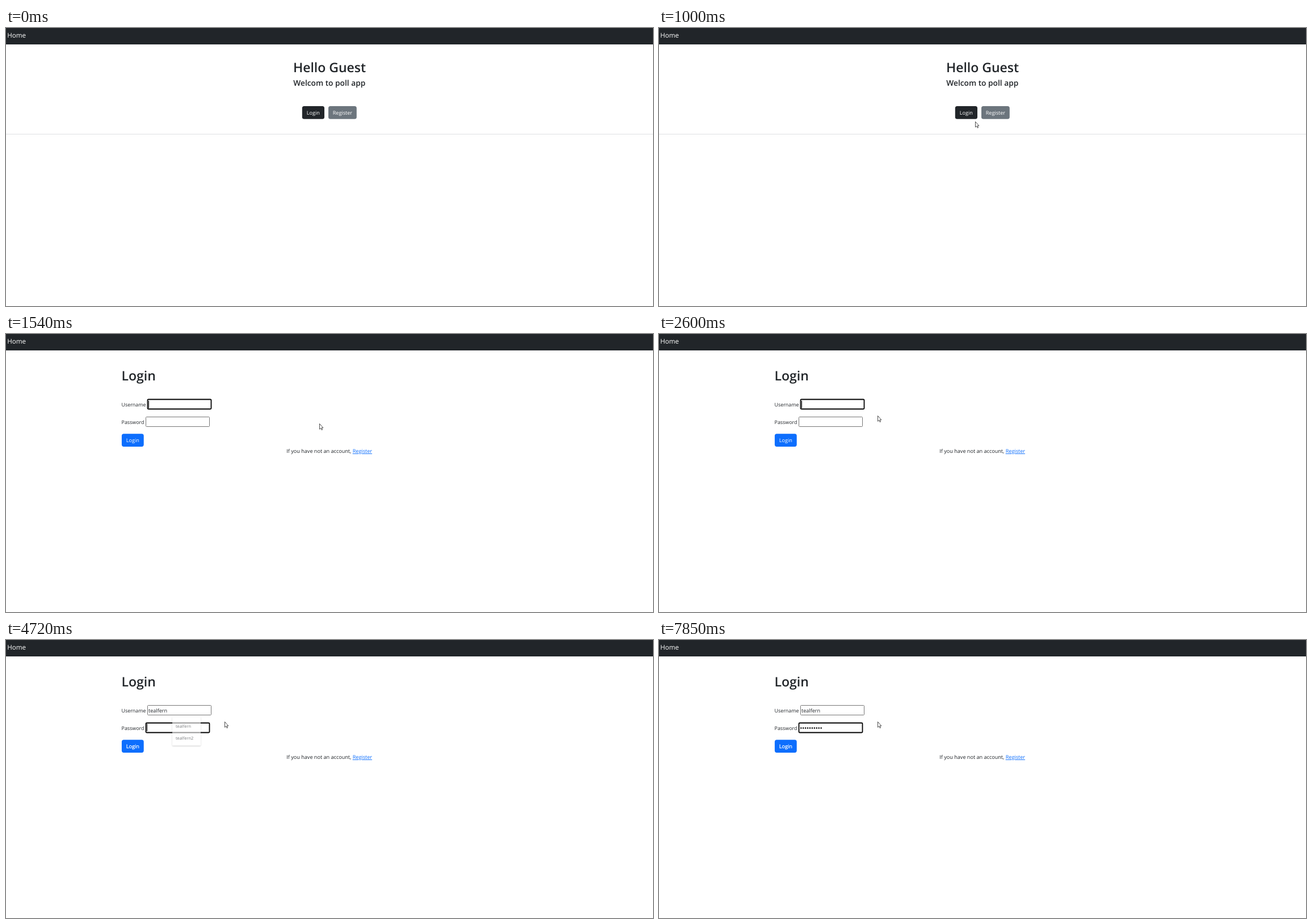
An HTML page for the animation above (8 s loop, 1140 by 491 pixels).

```html
<!DOCTYPE html>
<html lang="en">
<head>
<meta charset="utf-8">
<title>Poll app</title>
<style>
  html, body { margin: 0; height: 100%; overflow: hidden; background: #fff; }
  svg { display: block; width: 100%; height: 100%; }
  text { font: 9.1px "Open Sans", "Noto Sans", sans-serif; fill: #212529; text-rendering: geometricPrecision; white-space: pre; }
  .mid { text-anchor: middle; }
  .h1 { font-size: 23px; font-weight: 600; }
  .h4 { font-size: 13.75px; font-weight: 600; }
  .brand { font-size: 11.6px; }
  .label { font-size: 8.85px; }
  .light { fill: #fff; }
  .link { fill: #0d6efd; text-decoration: underline; }
  .field { fill: #fff; stroke: #767676; rx: 1px; }
  .field.focus { stroke: #000; stroke-width: 1.8; rx: 1.5px; }
  #popup { filter: drop-shadow(0 1px 1px #0005); }
  #popup text { font-size: 7.4px; }
</style>
</head>
<body>
<svg viewBox="0 0 1140 491">
  <rect width="1140" height="29" fill="#212529"/>
  <text class="brand light" x="2.2" y="17.4">Home</text>

  <g id="welcome">
    <text class="h1 mid" x="570" y="77.7">Hello Guest</text>
    <text class="h4 mid" x="569.8" y="101.5">Welcom to poll app</text>
    <rect id="loginBtn" x="521.8" y="138" width="39.2" height="22.8" rx="3.6"/>
    <text class="light mid" x="541.3" y="153">Login</text>
    <rect x="568" y="138" width="49.8" height="22.8" rx="3.6" fill="#6c757d"/>
    <text class="light mid" x="592.9" y="153">Register</text>
    <rect y="187" width="1140" height="1" fill="#dee0e2"/>
  </g>

  <g id="form">
    <text class="h1" x="203.5" y="82">Login</text>
    <text class="label" x="203.6" y="128">Username</text>
    <rect id="userBox" class="field" x="249.5" y="115.5" width="112" height="17"/>
    <text id="user" x="251" y="128"></text>
    <text class="label" x="203.6" y="158.5">Password</text>
    <rect id="passBox" class="field" x="246.5" y="146.5" width="112" height="17"/>
    <g id="dots"></g>
    <rect id="caret" width="1" height="13"/>
    <rect x="203.9" y="176.3" width="38.8" height="22.6" rx="3.6" fill="#0d6efd"/>
    <text id="submit" class="light mid" x="223.3" y="191.4" stroke="#fff">Login</text>
    <text x="494.2" y="210">If you have not an account, <tspan class="link">Register</tspan></text>
    <g id="popup">
      <rect x="293" y="136" width="50" height="50.5" rx="1" fill="#fff"/>
      <text x="299" y="155">tealfern</text>
      <text x="299" y="176">tealfern2</text>
    </g>
  </g>

  <path id="cursor" d="M.5 .5V10.2L2.7 8.2 4.2 11.5 5.6 10.9 4.2 7.7H6.9Z" fill="#fff" stroke="#222" stroke-width=".8"/>
</svg>
<script>
const LOOP = 8000, OPEN = 1540, TAB = 4720, BLINK = 530, DOT = 3.93;
const NAME = "tealfern";
const userKeys = [3000, 3060, 3260, 3390, 3930, 4260, 4350, 4450];
const passKeys = [4920, 5110, 5310, 5640, 5840, 6110, 6380, 6710, 6840, 7320];
// time, x, y of the pointer tip
const path = [
  [870, 568, 182], [940, 562, 173], [1000, 557, 165], [1130, 554, 161], [1270, 552, 158],
  [1670, 552, 158], [1730, 530, 164], [1800, 470, 160], [1900, 405, 147], [2000, 385, 144]
];

const $ = id => document.getElementById(id);
const show = (id, on) => $(id).style.display = on ? "" : "none";
const mix = (a, b, k) => a + (b - a) * k;
const typed = (keys, t) => keys.filter(k => k <= t).length;

for (let i = 0; i < passKeys.length; i++) {
  const dot = document.createElementNS("http://www.w3.org/2000/svg", "circle");
  dot.setAttribute("cx", 248.3 + DOT * (i + 0.5));
  dot.setAttribute("cy", 155.4);
  dot.setAttribute("r", 1.25);
  $("dots").append(dot);
}

function pointer(t) {
  if (t < 870) {
    const k = 1 - (1 - (t - 70) / 800) ** 2;
    return [mix(1081, 568, k), mix(476, 182, k)];
  }
  const i = path.findIndex(p => p[0] > t);
  if (i < 0) return path.at(-1).slice(1);
  const [a, b] = [path[i - 1], path[i]];
  const k = (t - a[0]) / (b[0] - a[0]);
  return [mix(a[1], b[1], k), mix(a[2], b[2], k)];
}

function drawForm(t) {
  const onPass = t >= TAB;
  $("userBox").classList.toggle("focus", !onPass);
  $("passBox").classList.toggle("focus", onPass);
  $("user").textContent = NAME.slice(0, typed(userKeys, t));
  const count = typed(passKeys, t);
  [...$("dots").children].forEach((d, i) => d.style.display = i < count ? "" : "none");

  const last = Math.max(...[OPEN, TAB, ...userKeys, ...passKeys].filter(k => k <= t));
  show("caret", (t - last) % (2 * BLINK) < BLINK);
  const x = onPass ? 248 + DOT * count : 251 + $("user").getComputedTextLength();
  $("caret").setAttribute("x", Math.floor(x));
  $("caret").setAttribute("y", onPass ? 148 : 118);

  $("submit").setAttribute("stroke-width", onPass ? 0.25 : 0);
  show("popup", t >= userKeys[1] && t < 4920);
  $("popup").style.opacity = onPass ? 0.6 * (1 - (t - TAB) / 200) : 1;
}

function draw(t) {
  show("welcome", t < OPEN);
  show("form", t >= OPEN);
  show("cursor", t >= 70);
  $("cursor").setAttribute("transform", `translate(${pointer(t)})`);
  const pressed = t >= 1410 && t < 1470;
  $("loginBtn").setAttribute("fill", pressed ? "#4d5154" : t >= 1200 ? "#424649" : "#212529");
  if (t >= OPEN) drawForm(t);
}

const start = performance.now();
function tick() {
  draw((performance.now() - start) % LOOP);
  requestAnimationFrame(tick);
}
tick();
</script>
</body>
</html>
```
